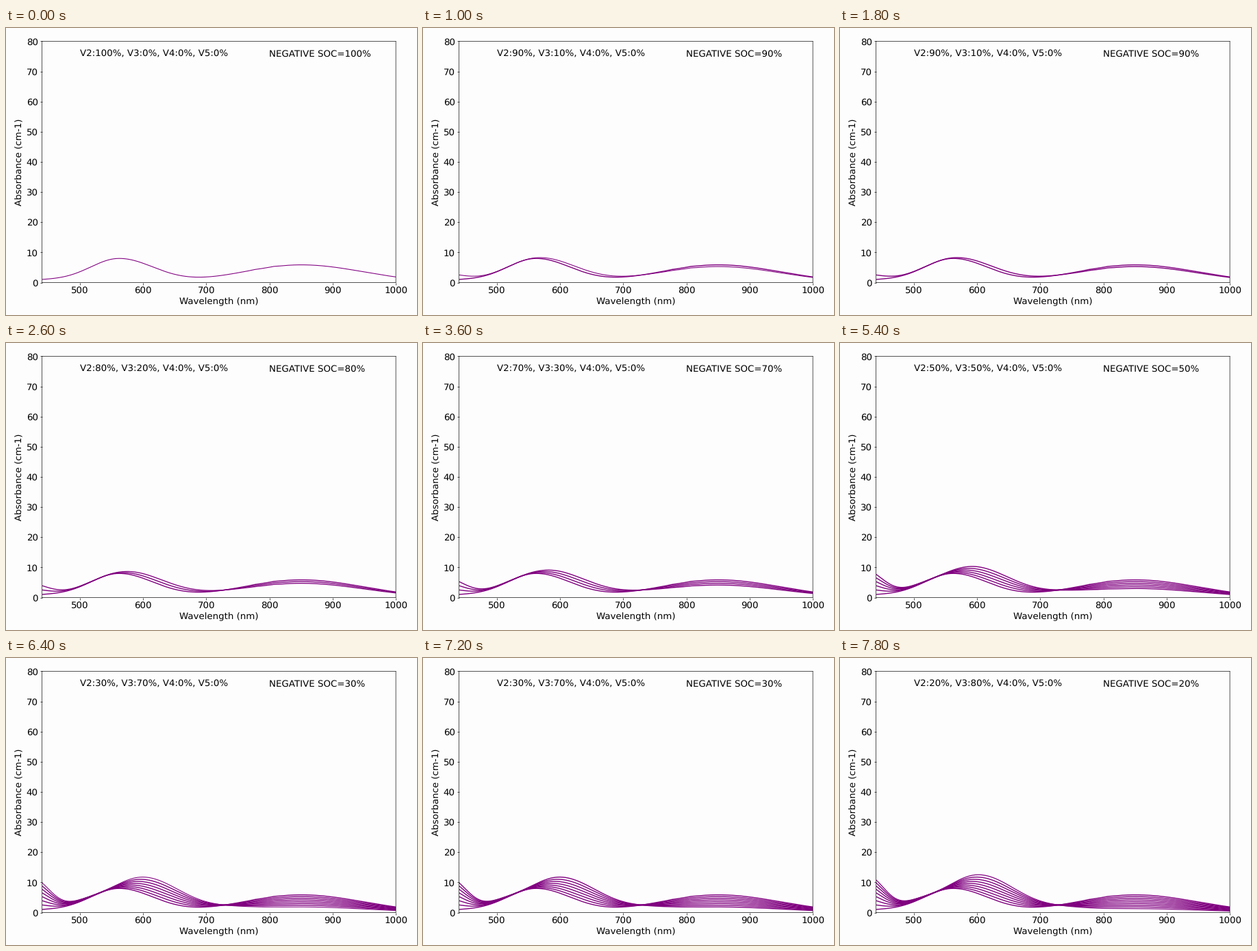
A matplotlib script for the animation above (8 s loop, 600 px wide and 420 px high).

```python
import numpy as np
import matplotlib.pyplot as plt
from matplotlib.animation import FuncAnimation

W, H, DPI = 600, 420, 60
FRAMES, INTERVAL = 40, 200
STEP_FRAMES, STEP_OFFSET = 4.5, 0.25
PAPER = "#fefdfe"

plt.rcParams.update({"font.family": "DejaVu Sans", "font.size": 16,
                     "text.hinting": "none", "path.snap": False})

wave = np.linspace(440, 1000, 561)


def band(height, centre, left, right=None):
    """Absorption band with its own width on either side of the peak."""
    width = np.where(wave < centre, left, right or left)
    return height * np.exp(-0.5 * ((wave - centre) / width) ** 2)


v2_curve = (band(7.95, 562, 47, 55) + band(5.87, 850, 91, 99)
            + band(0.75, 440, 40)
            + band(0.07, 777, 4) + band(0.1, 807, 4))
v3_curve = (band(14, 606, 53, 57) + band(2.2, 505, 25)
            + band(1, 738, 38) + band(15.1, 424.6, 28) + 0.15)
edge = 3.9 * np.exp(-(wave - 440) / 15)


def spectrum(v3):
    """Mixture spectrum; the blue edge bends slightly with the share."""
    return (1 - v3) * v2_curve + v3 * v3_curve + edge * v3 * (0.8 - v3)


def level(i):
    """Number of 10 % steps reached in frame i."""
    return int(max(0, (i - STEP_OFFSET) / STEP_FRAMES))


levels = [level(i) for i in range(FRAMES)]
starts = [levels.index(n) for n in range(levels[-1] + 1)]

fig = plt.figure(figsize=(W / DPI, H / DPI), dpi=DPI, facecolor=PAPER)
left, right, top, bottom = 52.5, 569.1, 19.5, 372.5
ax = fig.add_axes([left / W, 1 - bottom / H, (right - left) / W,
                   (bottom - top) / H], facecolor=PAPER)
ax.set_xlim(440, 1000)
ax.set_ylim(0, 80)
ax.set_xticks(range(500, 1001, 100))
ax.set_yticks(range(0, 81, 10))
ax.set_xlabel("Wavelength (nm)")
ax.set_ylabel("Absorbance (cm-1)")

mix_text = ax.text(500, 75, "")
soc_text = ax.text(799.5, 75, "")
lines = [ax.plot(wave, spectrum(n / 10), color="purple")[0]
         for n in range(len(starts))]


def update(i):
    v3 = 10 * levels[i]
    v2 = 100 - v3
    mix_text.set_text(f"V2:{v2}%, V3:{v3}%, V4:0%, V5:0%")
    soc_text.set_text(f"NEGATIVE SOC={v2}%")
    for line, start in zip(lines, starts):
        age = i - start
        line.set_visible(age >= 0)
        # A fresh curve is thin and gains weight over its first frames
        line.set_linewidth(1.3 + 0.1 * np.clip(age, 0, 4))
    return [mix_text, soc_text, *lines]


anim = FuncAnimation(fig, update, frames=FRAMES, interval=INTERVAL,
                     init_func=lambda: update(0), repeat=True, repeat_delay=0)
plt.show()
```
